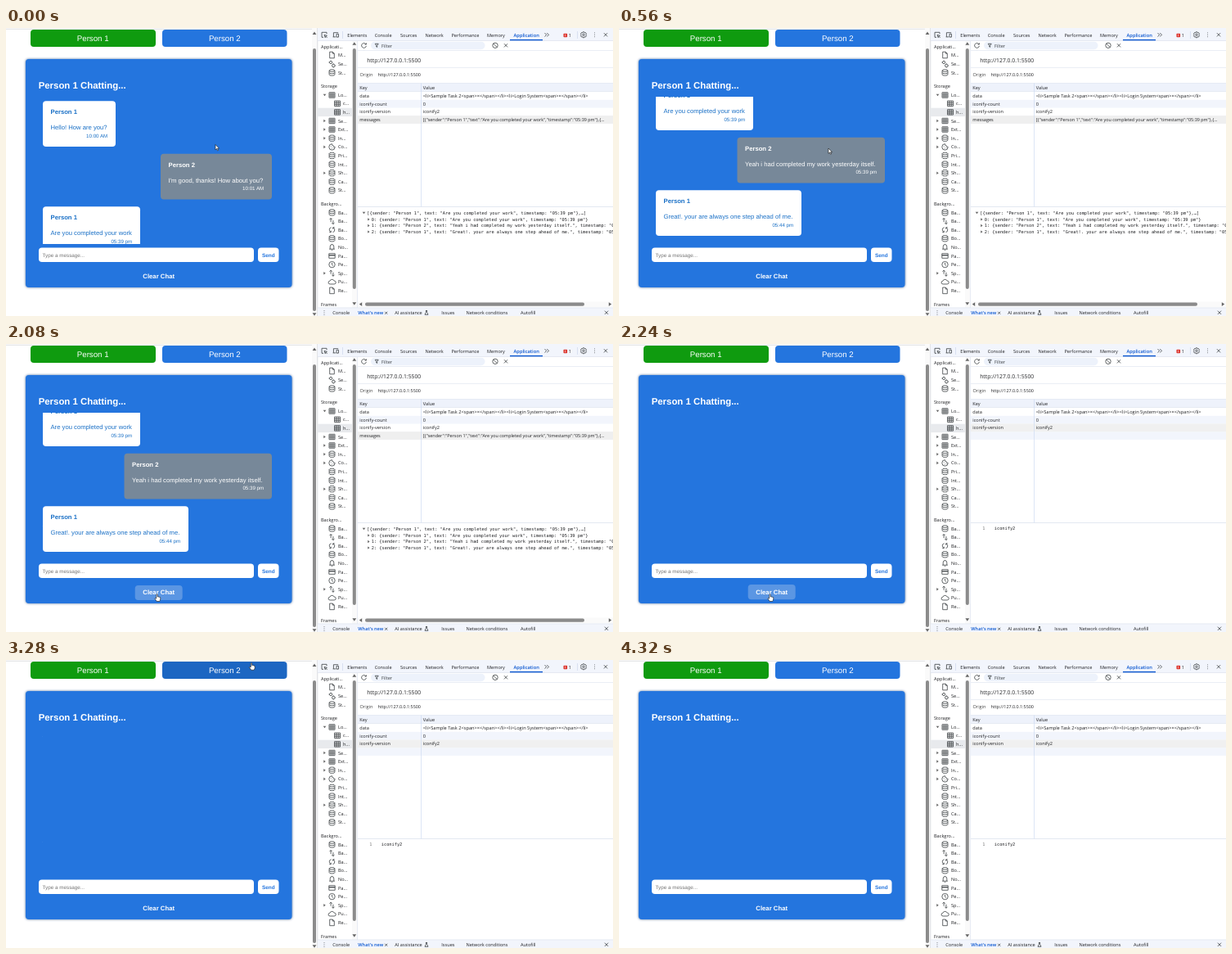
An HTML page for the animation above (4400 ms loop, 742 by 352 pixels).

```html
<!DOCTYPE html>
<html lang="en">
<head>
<meta charset="utf-8">
<title>Chat and storage panel</title>
<style>
html, body { margin: 0; width: 100%; height: 100%; overflow: hidden; background: #fff; }
svg { display: block; }
text { white-space: pre; text-rendering: geometricPrecision; }
.page { font-family: "Liberation Sans", Arial, sans-serif; }
.tools { font-family: "Open Sans", "Noto Sans", sans-serif; }
.mono { font-family: "DejaVu Sans Mono", monospace; }
.icon { fill: none; stroke: #3c4043; stroke-width: .8; stroke-linejoin: round; }
</style>
</head>
<body>
<svg id="stage" width="742" height="352" viewBox="0 0 742 352"></svg>
<script>
const BLUE = '#2475de', CHAT_INK = '#1a70c6', INK = '#202124', LINK = '#0b57d0';
const BAR = '#f2f5fc', LINE = '#dde3ee', THUMB = '#8b8b8b';
const LOOP = 4400, STEP = 80;

const esc = s => s.replace(/&/g, '&amp;').replace(/</g, '&lt;');
const rect = (x, y, w, h, fill, r = 0, more = '') =>
  `<rect x="${x}" y="${y}" width="${w}" height="${h}" rx="${r}" fill="${fill}" ${more}/>`;
const text = (x, y, s, size, fill = INK, more = '') =>
  `<text x="${x}" y="${y}" font-size="${size}" fill="${fill}" ${more}>${esc(s)}</text>`;
const MID = 'text-anchor="middle"', END = 'text-anchor="end"', BOLD = 'font-weight="bold"';

// Icons are drawn around their own centre.
const ICONS = {
  doc: 'M-2.8-3.8H.8L2.8-1.8V3.8H-2.8ZM.8-3.8V-1.8H2.8',
  gears: 'M-3-2a1.6 1.6 0 1 0 3.2 0a1.6 1.6 0 1 0-3.2 0M0 2a1.8 1.8 0 1 0 3.6 0a1.8 1.8 0 1 0-3.6 0M-4-2h.8M-1.4-4.2v.6M1.8-.6v.7M1.8 3.8v.6M3.6 2h.7',
  db: 'M-3.4-2.4a3.4 1.3 0 1 0 6.8 0a3.4 1.3 0 1 0-6.8 0V2.4a3.4 1.3 0 0 0 6.8 0V-2.4M-3.4 0a3.4 1.3 0 0 0 6.8 0',
  grid: 'M-3.5-3.2H3.5V3.2H-3.5ZM-3.5-1H3.5M-3.5 1.1H3.5M-1.2-3.2V3.2M1.2-3.2V3.2',
  cookie: 'M0-3.7A3.7 3.7 0 1 0 3.7 0Q1.9.2 1.7-1.5Q0-1.6 0-3.7M-1.7-.8h.7M-.9 1.6h.7M1.2 1.2h.7',
  updown: 'M-1.4 1V-3.6M-3-2L-1.4-3.6L.2-2M1.4-1V3.6M-.2 2L1.4 3.6L3 2',
  sync: 'M-1-3Q-3.4-2.4-3.2 0Q-3 2-1.4 2.8M-3.2 2.9H-1.2V1M1 3Q3.4 2.4 3.2 0Q3-2 1.4-2.8M3.2-2.9H1.2V-1',
  bell: 'M-3.3 2.3H3.3M-2.3 2.3V-.8a2.3 2.5 0 0 1 4.6 0V2.3M-.6 3.6H.6M0-4V-3.3',
  card: 'M-3.7-2.8H3.7V2.8H-3.7ZM-3.7-1H3.7M-3.7-.5H3.7',
  clock: 'M-3.7 0a3.7 3.7 0 1 0 7.4 0a3.7 3.7 0 1 0-7.4 0M0-2.2V.2L1.6 1.6',
  cloud: 'M-2.4 2.7a1.9 1.9 0 0 1-.2-3.8a2.8 2.8 0 0 1 5.2-.2a2 2 0 0 1 .2 4Z',
  inspect: 'M-1 3H-3V-3H3V-1M0 0L3.4 1.2L1.8 1.8L1.2 3.4ZM2 2L3.6 3.6',
  device: 'M-3.4 2.6H.2M-2.6 2.6V-2.6H3.2M1-1H3.5V2.8H1Z',
  reload: 'M2.4-1.6A2.9 2.9 0 1 0 2.9.6M2.9-3V-1.2H1',
  funnel: 'M-2-2.1H2L.5 0V2L-.5 1.5V0Z',
  block: 'M-3.2 0a3.2 3.2 0 1 0 6.4 0a3.2 3.2 0 1 0-6.4 0M-2.2-2.2L2.2 2.2',
  close: 'M-2.1-2.1L2.1 2.1M2.1-2.1L-2.1 2.1',
  small: 'M-1.5-1.5L1.5 1.5M1.5-1.5L-1.5 1.5',
  more: 'M-2.5-2.2L-.3 0L-2.5 2.2M.3-2.2L2.5 0L.3 2.2',
  gear: 'M-1.2 0a1.2 1.2 0 1 0 2.4 0a1.2 1.2 0 1 0-2.4 0M-1-3.4H1L1.4-2.4L2.6-2.6L3.5-.9L2.8 0L3.5.9L2.6 2.6L1.4 2.4L1 3.4H-1L-1.4 2.4L-2.6 2.6L-3.5.9L-2.8 0L-3.5-.9L-2.6-2.6L-1.4-2.4Z',
  dots: 'M-.4-2.4h.8M-.4 0h.8M-.4 2.4h.8',
  flask: 'M-1-2.5H1M-.6-2.5V-.6L-2 2.3H2L.6-.6V-2.5'
};
const icon = (name, x, y) => `<path class="icon" d="${ICONS[name]}" transform="translate(${x} ${y})"/>`;
const arrow = (x, y, angle, size = 2.4) =>
  `<path d="M${-size} ${size * .7}L0 ${-size * .7}L${size} ${size * .7}Z" fill="#666" transform="translate(${x} ${y}) rotate(${angle})"/>`;

// Bubbles: left, width, sender, message, time
const CHAT = [
  [45, 89, 1, 'Hello! How are you?', '10:00 AM'],
  [189, 136, 2, "I'm good, thanks! How about you?", '10:01 AM'],
  [45, 119, 1, 'Are you completed your work', '05:39 pm'],
  [144.5, 180.5, 2, 'Yeah i had completed my work yesterday itself.', '05:39 pm'],
  [45, 178, 1, 'Great!. your are always one step ahead of me.', '05:44 pm']
];
const bubble = ([x, w, who, msg, time], i) => {
  const y = 89.2 + i * 64.5, ink = who === 1 ? CHAT_INK : '#fff';
  return rect(x, y, w, 55.8, who === 1 ? '#fff' : '#778899', 4) +
    text(x + 9.5, y + 16.2, 'Person ' + who, 7.7, ink, BOLD) +
    text(x + 9.5, y + 34.8, msg, 7.68, ink) +
    text(x + w - 9.8, y + 44.6, time, 6.2, ink, END);
};

function page() {
  return `<g class="page">` +
    rect(0, .8, 375, .8, '#d5d7da') +
    rect(30, 2, 153, 21, '#0f9b0f', 4) + text(106.2, 16, 'Person 1', 9.7, '#fff', MID) +
    rect(191, 2, 152.5, 21, BLUE, 4, 'id="tab"') + text(267.3, 16, 'Person 2', 9.7, '#fff', MID) +
    rect(24, 38, 325.5, 279, BLUE, 4, 'style="filter:drop-shadow(0 0 1.5px #456a9c)"') +
    text(39.7, 73.8, 'Person 1 Chatting...', 11.4, '#fff', BOLD) +
    `<clipPath id="view"><rect x="24" y="84" width="325" height="180"/></clipPath>` +
    `<g clip-path="url(#view)"><g id="chat">${CHAT.map(bubble).join('')}</g></g>` +
    rect(40, 268.5, 263, 17.5, '#fff', 4) + text(44.6, 279.5, 'Type a message...', 6.3, '#757575') +
    rect(308, 268.5, 25.5, 17.5, '#fff', 4) + text(320.8, 279.5, 'Send', 6.4, BLUE, MID + ' ' + BOLD) +
    `<g id="clear">` + rect(157.7, 294, 58, 18.2, '#f0f0f0', 4, 'id="glow" opacity=".27"') +
    text(186.7, 305.6, 'Clear Chat', 7.75, '#fff', MID + ' ' + BOLD) + `</g></g>` +
    rect(374, 0, 6.5, 352, '#fafafa') + rect(375, 25, 4, 321, THUMB, 2) +
    arrow(377, 6.3, 0) + arrow(377, 350, 180) + rect(380.5, 0, .7, 352, '#c9ccd1');
}

// Sidebar rows: y, label, icon, expander, child level
const SIDE = [
  [33, 'M...', 'doc'], [44, 'Se...', 'gears'], [54.5, 'St...', 'db'],
  [82, 'Lo...', 'grid', 180], [92.3, 'c...', 'grid', 0, 1], [102.9, 'h...', 'grid', 0, 1],
  [113.5, 'Se...', 'grid', 90], [124, 'Ext...', 'grid', 90], [134.7, 'In...', 'db', 90],
  [145.4, 'Co...', 'cookie', 90], [156, 'Pri...', 'db'], [166.6, 'Int...', 'db'],
  [177.2, 'Sh...', 'db', 90], [187.8, 'Ca...', 'db'], [198.4, 'St...', 'db'],
  [225.5, 'Ba...', 'db'], [236.1, 'Ba...', 'updown'], [246.7, 'Ba...', 'sync'],
  [257.3, 'Bo...', 'db'], [267.9, 'No...', 'bell'], [278.5, 'Pa...', 'card'],
  [289.1, 'Pe...', 'clock'], [299.7, 'Sp...', 'updown', 90], [310.3, 'Pu...', 'cloud'], [320.9, 'Re...', 'doc']
];
const sideRow = ([y, label, pic, turn, child = 0]) =>
  icon(pic, 398.5 + child * 6.5, y) + text(406 + child * 6, y + 2, label, 5.6) +
  (turn ? arrow(389.5, y, turn, 1.8) : '');

function sidebar() {
  return rect(381, 97.7, 42, 10.4, '#e8eaed') +
    [[25, 'Applicati...'], [73, 'Storage'], [217, 'Backgro...'], [340, 'Frames']]
      .map(([y, s]) => text(385, y, s, 5.6)).join('') +
    SIDE.map(sideRow).join('') +
    rect(423, 16, 6, 326, '#fafafa') + rect(423.8, 25, 4, 294, THUMB, 2) +
    arrow(425.8, 19, 0) + arrow(425.8, 337, 180) + rect(429.3, 16, .7, 326, LINE);
}

function toolbars() {
  const tabs = [[417.3, 'Elements'], [450.7, 'Console'], [482, 'Sources'], [512.5, 'Network'],
    [544.5, 'Performance'], [588, 'Memory']];
  const drawer = [[399.3, 'Console'], [475.3, 'AI assistance'], [532.3, 'Issues'],
    [562.5, 'Network conditions'], [629, 'Autofill']];
  return rect(381, 0, 361, 15.5, BAR) + rect(381, 15, 361, .7, LINE) +
    icon('inspect', 389, 8.3) + icon('device', 403, 8.3) + rect(411, 4, .6, 9, '#c8d3ea') +
    tabs.map(([x, s]) => text(x, 11, s, 5.6)).join('') +
    text(620.5, 11, 'Application', 5.75, LINK, 'font-weight="600"') + rect(616, 13.9, 40, 1.4, LINK) +
    icon('more', 661, 8.3) + rect(681.5, 6.8, 4.6, 4.4, '#dc362e', .8) + rect(683.5, 7.6, .6, 2.7, '#fff') +
    text(687.8, 11, '1', 5.6) + rect(698, 4, .6, 9, '#c8d3ea') +
    icon('gear', 706, 8.3) + icon('dots', 719.5, 8.3) + icon('close', 733, 8.3) +
    icon('reload', 437.5, 21.3) + rect(446, 16.7, 139.5, 9.5, '#edf2fb', 4.7) +
    icon('funnel', 453.2, 21.4) + text(459, 23.6, 'Filter', 5.6, '#3c4043') +
    icon('block', 598, 21.3) + icon('close', 611, 21.3) + rect(430, 27, 312, .6, LINE) +
    rect(381, 342, 361, 10, BAR) + rect(381, 341.6, 361, .7, LINE) + icon('dots', 389, 348) +
    drawer.map(([x, s]) => text(x, 350.4, s, 5.6)).join('') +
    text(430.3, 350.4, "What's new", 5.6, LINK, 'font-weight="600"') +
    icon('small', 464.7, 348.3) + icon('flask', 514, 348) + icon('close', 734, 347.8);
}

function table() {
  const rows = [['data', '<li>Sample Task 2<span>×</span></li><li>Login System<span>×</span></li>', 5.68],
    ['iconify-count', '0', 5.6], ['iconify-version', 'iconify2', 5.6]];
  const row = ([key, value, size], i) =>
    text(432.3, 85 + i * 9.7, key, 5.55) + text(509.8, 85 + i * 9.7, value, size);
  return text(441.2, 41.8, 'http://127.0.0.1:5500', 6.8) + rect(430, 48, 312, .6, LINE) +
    text(432.5, 58.8, 'Origin', 5.6, '#474747') + text(454.5, 58.8, 'http://127.0.0.1:5500', 5.4) +
    rect(430, 67.5, 312, 10.2, '#eef2fb') + rect(430, 67.2, 312, .6, LINE) + rect(430, 77.4, 312, .6, LINE) +
    text(432.3, 74.8, 'Key', 5.6) + text(509.8, 74.8, 'Value', 5.6) +
    rect(430, 87.8, 312, 9.7, BAR) + rect(430, 107.2, 312, 9.7, BAR) +
    rect(430, 97.5, 312, 9.7, '#f0f0f0', 0, 'class="empty"') +
    rows.map(row).join('') +
    `<g class="full">` + rect(430, 107.2, 312, 9.7, '#efefef') +
    row(['messages', '[{"sender":"Person 1","text":"Are you completed your work","timestamp":"05:39 pm"},{…', 5.45], 3) + `</g>` +
    rect(507.2, 67.5, .7, 151, '#cfdcf3') + rect(430, 218.2, 312, .8, LINE);
}

function preview() {
  const entry = ([, , who, msg, time]) => `{sender: "Person ${who}", text: "${msg}", timestamp: "${time}"}`;
  const saved = CHAT.slice(2).map(entry);
  return `<g class="full mono">` + arrow(437.5, 226, 180, 1.8) + text(441.3, 228, `[${saved[0]},…]`, 5.3) +
    saved.map((s, i) => arrow(443.4, 233.9 + i * 7.6, 90, 1.7) + text(446.8, 235.8 + i * 7.6, `${i}: ${s}`, 5.3)).join('') +
    rect(430, 334.5, 312, 6.5, '#fafafa') + rect(439, 335.5, 268, 4.2, THUMB, 2) +
    arrow(433.5, 337.6, -90) + arrow(738.5, 337.6, 90) + `</g>` +
    `<g class="empty mono">` + text(444.3, 227, '1', 5.3, '#777') + text(458.8, 227, 'iconify2', 5.3) + `</g>`;
}

const pointers = `<g id="arrow"><path d="M0 0V6.4L1.5 5L2.6 7.4L3.6 6.9L2.5 4.7H4.5Z" fill="#fff" stroke="#111" stroke-width=".6"/></g>
<g id="hand"><path d="M-.7 5.2V.6Q0-.4.7.6V3.4Q1.5 2.8 2 3.6Q2.8 3 3.2 4Q4.2 3.6 4.2 4.8V6.6Q4 7.8 3.2 9H-.3Q-1.4 7.4-2.6 5.6Q-2.2 4.4-.7 5.6Z" fill="#fff" stroke="#111" stroke-width=".6"/></g>`;

const stage = document.getElementById('stage');
stage.innerHTML = page() + `<g class="tools">${sidebar() + toolbars() + table() + preview()}</g>` + pointers;

const $ = id => document.getElementById(id);
const show = (el, on) => el.setAttribute('visibility', on ? 'visible' : 'hidden');
const ease = p => p * p * (3 - 2 * p);

// Interpolates keys of the form [time, ...values].
function track(keys, t, curve = p => p) {
  const n = keys.findIndex(k => k[0] > t);
  if (n < 0) return keys[keys.length - 1].slice(1);
  const a = keys[n - 1], b = keys[n], p = curve((t - a[0]) / (b[0] - a[0]));
  return a.slice(1).map((v, i) => v + (b[i + 1] - v) * p);
}

const SCROLL = [[0, 0], [80, 58], [160, 106.1], [240, 138], [320, 149]];
const MOUSE = [[0, 256, 142.5], [320, 256, 142.5], [560, 256, 147], [1040, 256, 147],
  [1760, 184.5, 305.5], [2320, 184.5, 305.5], [2800, 192, 294.2], [3280, 300, 3.2]];
const CLEARED = 2160, GONE = 3360;

function draw(t) {
  const [x, y] = track(MOUSE, t, ease), here = t < GONE, cleared = t >= CLEARED;
  const onClear = here && x > 158 && x < 216 && y > 294 && y < 313;
  const onTab = here && x > 191 && x < 344 && y < 23;
  $('chat').setAttribute('transform', `translate(0 ${-track(SCROLL, t)[0]})`);
  show($('chat'), !cleared);
  stage.querySelectorAll('.full').forEach(el => show(el, !cleared));
  stage.querySelectorAll('.empty').forEach(el => show(el, cleared));
  show($('glow'), onClear);
  $('clear').setAttribute('transform', `translate(0 ${t >= 2000 && t < CLEARED ? .9 : 0})`);
  $('tab').setAttribute('fill', onTab ? '#1c66c2' : BLUE);
  for (const id of ['arrow', 'hand']) {
    $(id).setAttribute('transform', `translate(${x} ${y})`);
    show($(id), here && (id === 'hand') === (onClear || onTab));
  }
}

const start = performance.now();
function tick() {
  const t = (performance.now() - start) % LOOP;
  draw(Math.floor(t / STEP) * STEP);
  requestAnimationFrame(tick);
}
tick();
</script>
</body>
</html>
```
